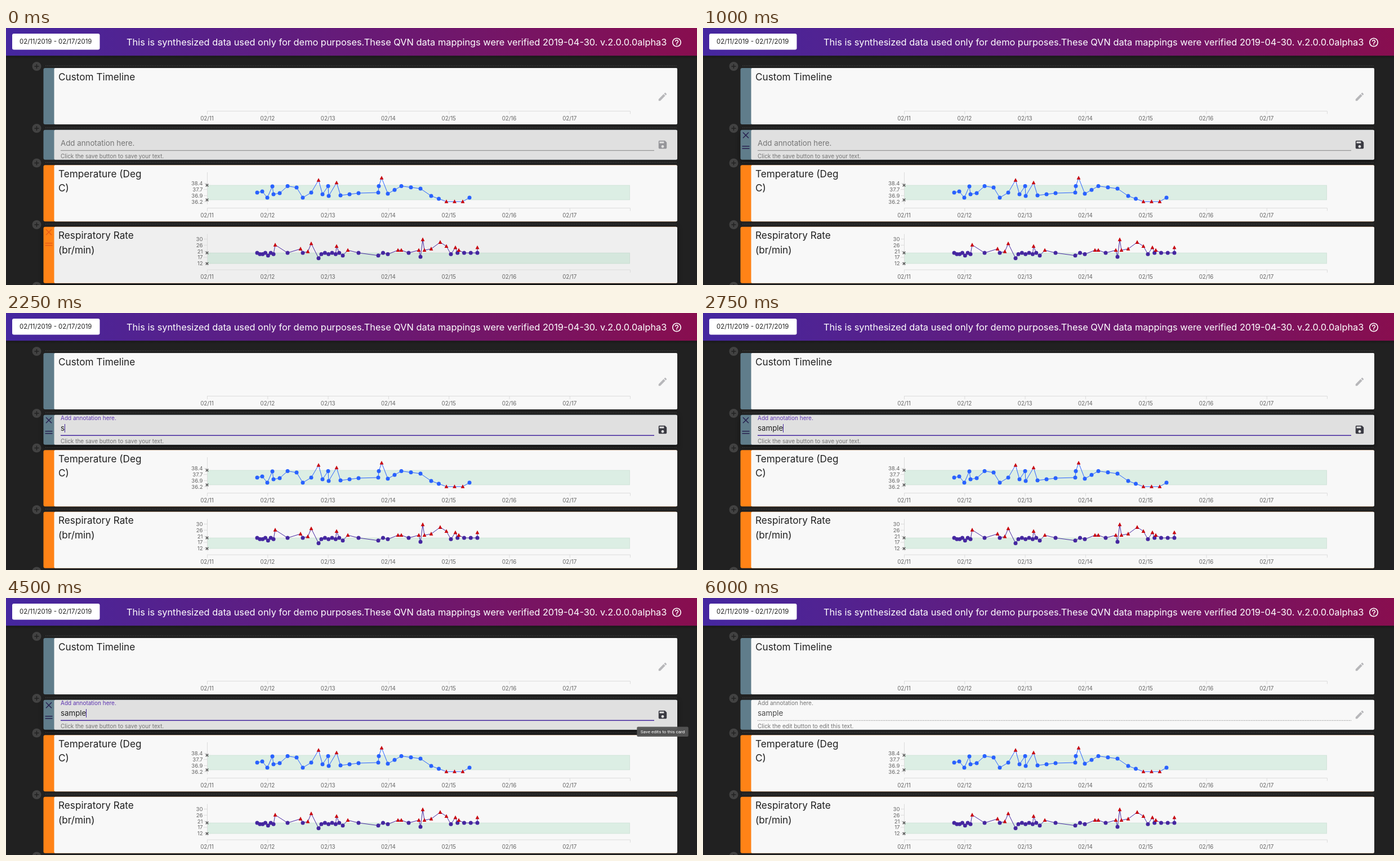
Write an HTML page that moves like this. It is 1227 by 456 pixels and loops after 6750 ms.

```html
<!DOCTYPE html>
<html lang="en">
<head>
<meta charset="utf-8">
<title>Patient timeline</title>
<style>
html, body { margin: 0; width: 100%; height: 100%; overflow: hidden; background: #212121; }
svg { display: block; font-family: Inter, "Open Sans", sans-serif; fill: #212121; }
.title { font-size: 17.2px; }
.axis { font-size: 9.8px; fill: #666; text-anchor: middle; }
.yaxis { font-size: 9.6px; fill: #666; text-anchor: end; }
.small { font-size: 10px; fill: #757575; }
.rule { stroke: #dcdcdc; fill: none; }
.tip { font: 8px Roboto, sans-serif; fill: #fff; text-anchor: middle; }
</style>
</head>
<body>
<svg id="stage" width="1227" height="456" viewBox="0 0 1227 456"></svg>
<script>
const LOOP = 6750;
const PENCIL = 'M3 17.25V21h3.75L17.81 9.94l-3.75-3.75L3 17.25zM20.71 7.04c.39-.39.39-1.02 0-1.41l-2.34-2.34c-.39-.39-1.02-.39-1.41 0l-1.83 1.83 3.75 3.75 1.83-1.83z';
const DISK = 'M17 3H5c-1.11 0-2 .9-2 2v14c0 1.1.89 2 2 2h14c1.1 0 2-.9 2-2V7l-4-4zm-5 16c-1.66 0-3-1.34-3-3s1.34-3 3-3 3 1.34 3 3-1.34 3-3 3zm3-10H5V5h10v4z';
const HELP = 'M11 18h2v-2h-2v2zm1-16C6.48 2 2 6.48 2 12s4.48 10 10 10 10-4.48 10-10S17.52 2 12 2zm0 18c-4.41 0-8-3.59-8-8s3.59-8 8-8 8 3.59 8 8-3.59 8-8 8zm0-14c-2.21 0-4 1.79-4 4h2c0-1.1.9-2 2-2s2 .9 2 2c0 2-3 1.75-3 5h2c0-2.25 3-2.5 3-5 0-2.21-1.79-4-4-4z';

// Turning points of the temperature; medium gaps get a reading halfway
const turns = [
  [446,292],[455,290],[464,301],[473,281],[475,295],[486,293],[500,280.5],[516,283],[527,301],
  [542,292],[555,270],[562,295],[572,280.5],[573,298],[587,274.5],[594,297],[626,293],[661,292],
  [662,280.5],[667,266],[678,294],[702,280.5],[736,285],[755,298],[782,308],[811,308],[823,301]];
const temperature = turns.flatMap(([x, y], i) => {
  const [nx, ny] = turns[i + 1] || [x, y], gap = nx - x;
  return gap > 20 && gap < 35 ? [[x, y], [(x + nx) / 2, (y + ny) / 2]] : [[x, y]];
});

// Respiration: quiet runs [from, to, count] wobble around 19, with outlying [x, rate] between
const quiet = [[446, 475, 7], [500, 527, 2], [560, 598, 7], [661, 678, 3], [790, 837, 5]];
const outliers = [
  [478,26],[523,23],[536,21],[542,27],[555,16],[587,25],[607,22],[626,20],[696,22],[702,22],
  [715,20],[733,22],[736,17],[740,30],[743,22],[755,23],[771,28],[782,25],[798,24],[804,22],[837,24]];
const respiration = quiet
  .flatMap(([from, to, n]) => Array.from({ length: n }, (_, i) => {
    const x = from + (to - from) * i / (n - 1);
    return [x, Math.round(19.2 + Math.cos((x - 446) * .48))];
  }))
  .concat(outliers)
  .sort((a, b) => a[0] - b[0])
  .map(([x, rate]) => [x, 399 + (20 - rate) * 2.36]);

const icon = (path, x, y, attrs) =>
  `<path d="${path}" transform="translate(${x - 9.6} ${y - 9.6}) scale(.8)" ${attrs}/>`;
const panel = (y, h, attrs) => `<rect x="85.5" y="${y}" width="1106.5" height="${h}" rx="2" ${attrs}/>`;

function divider(y, id = '') {
  return `<g id="${id}" stroke="#484848" fill="#424242">
    <path d="M70 ${y - 1}H1192" stroke-dasharray="1.5 1.5"/>
    <circle cx="54.5" cy="${y}" r="8" stroke="none"/>
    <path d="M50.5 ${y}h8m-4 -4v8" stroke="#212121" stroke-width="1.5"/></g>`;
}

function card(id, y, h, colour, iconColour, body) {
  return `<g id="${id}"><rect x="66.5" y="${y}" width="1125.5" height="${h}" rx="3" fill="${colour}"/>
    ${panel(y, h, 'class="face" fill="#f8f8f8"')}
    ${panel(y, h, 'class="shade" fill="#000"')}
    <path class="handle" d="M71 ${y + 4.5}l10 10m0 -10l-10 10M69.5 ${y + 29}h13m-13 4h13"
      stroke="${iconColour}" stroke-width="1.5"/>${body}</g>`;
}

function title(y, ...lines) {
  return lines.map((s, i) => `<text class="title" x="93" y="${y + 21.5 + i * 25.5}">${s}</text>`).join('');
}

function timeAxis(y) {
  let out = `<path class="rule" d="M357.5 ${y + 81.5}v-5H1108.5v5"/>`;
  for (let i = 0; i < 7; i++) {
    const x = 357 + i * 107.3;
    out += `<path class="rule" d="M${x + .5} ${y + 76}v6"/>
      <text class="axis" x="${x}" y="${y + 92.5}">02/${11 + i}</text>`;
  }
  return out;
}

function chart(y, points, colour, top, bottom, labels) {
  const cross = cy => `<path d="M354.7 ${cy - 2.3}l4.6 4.6m0 -4.6l-4.6 4.6" stroke="#555" stroke-width="1.5"/>`;
  const mark = ([x, py]) => py < top - .5 || py > bottom
    ? `<path d="M${x} ${py - 3.8}l3.4 6.6h-6.8z" fill="#c8000a"/>`
    : `<circle cx="${x}" cy="${py}" r="3.5" fill="${colour}"/>`;
  const ticks = labels.map((s, i) => {
    const ty = y + 65.2 - (labels.length - 1 - i) * 10.8;
    return `<path class="rule" d="M351 ${ty}h6"/><text class="yaxis" x="349.5" y="${ty + 3.5}">${s}</text>`;
  }).join('');
  return `<rect x="357.5" y="${top}" width="750" height="${bottom - top}" fill="#3db573" fill-opacity=".15"
      stroke="#7fa893" stroke-opacity=".2"/>
    <path class="rule" d="M357.5 ${y + 13}v57"/>${ticks}${timeAxis(y)}
    <path d="M${points.join('L')}" fill="none" stroke="${colour}"/>
    ${points.map(mark).join('')}${cross(top)}${cross(bottom)}`;
}

const note = `
  <text id="label" x="97">Add annotation here.</text>
  <text id="entry" x="97" y="209" font-size="13.3"></text>
  <rect id="caret" y="197" width="1" height="15" fill="#4527a0"/>
  <path id="line" d="M97 217.3H1151" stroke="#858585"/>
  <path id="focusLine" stroke="#4527a0" stroke-width="1.6"/>
  <text id="hint" class="small" x="97" y="230.5"></text>
  ${icon(DISK, 1166, 207, 'id="disk" fill="#3a3a42"')}
  ${icon(PENCIL, 1166, 207, 'id="pencil" fill="#3a3a42"')}`;

const $ = id => document.getElementById(id);
$('stage').innerHTML = `
  <defs>
    <linearGradient id="bar"><stop stop-color="#4527a0"/><stop offset="1" stop-color="#880e4f"/></linearGradient>
    <linearGradient id="fade" x2="0" y2="1"><stop stop-opacity=".25"/><stop offset="1" stop-opacity="0"/></linearGradient>
  </defs>
  <rect width="1227" height="49.2" fill="url(#bar)"/>
  <rect y="49.2" width="1227" height="6" fill="url(#fade)"/>
  <rect x="11" y="10" width="155.5" height="28.5" rx="3" fill="#fff"/>
  <text x="24" y="28" font-size="11.4">02/11/2019 - 02/17/2019</text>
  <text x="214" y="31" font-size="16.37" fill="#fff">This is synthesized data used only for demo purposes.These QVN data mappings were verified 2019-04-30. v.2.0.0.0alpha3</text>
  ${icon(HELP, 1191, 25.5, 'fill="#fff"')}
  ${[68, 178, 349, 458.5].map(y => divider(y)).join('')}${divider(239.5, 'gap')}
  ${card('custom', 71, 100, '#607d8b', '#263238',
    title(71, 'Custom Timeline') + timeAxis(71) + icon(PENCIL, 1166, 122, 'fill="#3a3a42" opacity=".34"'))}
  ${card('note', 180.7, 53, '#607d8b', '#27204f', note)}
  ${card('temp', 243.2, 100, '#ff8317', '#d84315', title(243, 'Temperature (Deg', 'C)')
    + chart(243, temperature, '#2962ff', 279, 305, ['38.4', '37.7', '36.9', '36.2']))}
  ${card('resp', 352.8, 100, '#ff8317', '#d84315', title(352.5, 'Respiratory Rate', '(br/min)')
    + chart(352.5, respiration, '#4527a0', 399, 418, [30, 26, 21, 17, 12]))}
  <g id="tip"><rect y="228.5" height="17.5" rx="2" fill="#555" fill-opacity=".95"/>
    <text class="tip" x="1166" y="240"></text></g>`;

// Value of the last [start, value] pair reached
const at = (t, ...steps) => steps.reduce((v, [start, next]) => t >= start ? next : v, steps[0][1]);
const set = (node, attrs) => { for (const k in attrs) node.setAttribute(k, attrs[k]); };

function hover(id, amount, shaded = true) {
  const g = $(id);
  g.style.filter = amount ? 'drop-shadow(0 3px 4px rgba(0,0,0,.5))' : '';
  set(g.querySelector('.shade'), { opacity: shaded ? Math.min(1, amount * 2) * .036 : 0 });
  set(g.querySelector('.handle'), { opacity: amount });
}

function render(t) {
  const saved = t >= 5000;
  const focus = saved ? 0 : at(t, [0, 0], [1500, .6], [1750, 1]);
  const lift = saved ? 1 : focus;
  const over = at(t, [0, 0], [750, .5], [1000, 1], [4000, .3], [4250, 1], [5750, .3], [6000, 0]);

  hover('custom', 0);
  hover('resp', at(t, [0, .6], [250, 0]));
  hover('temp', at(t, [0, 0], [250, .6], [500, .3], [750, 0]));
  hover('note', over, saved);
  set($('note').querySelector('.face'), { fill: saved ? '#f8f8f8' : '#e0e0e0' });
  set($('note').querySelector('.handle'), { stroke: saved ? '#263238' : '#27204f' });

  const lit = t >= 4000 && t < 4250;
  set($('gap'), {
    stroke: lit ? '#f0f0f0' : '#484848',
    fill: lit ? '#e0e0e0' : '#424242',
    'stroke-width': lit ? 1.6 : 1
  });

  set($('label'), { y: 209 - 19 * lift, 'font-size': 13.3 - 3.3 * lift, fill: focus ? '#5e35b1' : '#757575' });
  $('entry').textContent = at(t, [0, ''], [2250, 's'], [2500, 'samp'], [2750, 'sample']);
  set($('entry'), { fill: saved ? '#4a4a4a' : '#212121' });
  set($('caret'), {
    x: Math.round(97 + $('entry').getComputedTextLength()),
    opacity: at(t, [0, 0], [1500, 1], [1750, 0], [2250, 1], [3500, 0], [4000, 1], [5000, 0])
  });
  set($('line'), { 'stroke-dasharray': saved ? '1.5 1.5' : 'none', opacity: focus < 1 ? 1 : 0 });
  set($('focusLine'), { d: `M${624 - 527 * focus} 217.2H${624 + 527 * focus}` });
  const verb = saved ? 'edit' : 'save';
  $('hint').textContent = `Click the ${verb} button to ${verb} ${saved ? 'this' : 'your'} text.`;
  set($('disk'), { opacity: saved ? 0 : .45 + .55 * over });
  set($('pencil'), { opacity: saved ? .34 + .66 * over : 0 });

  const tip = at(t, [0, ''], [4500, 'Save edits to this card'], [5250, 'Edit this card'], [5750, '']);
  const [box, words] = $('tip').children;
  words.textContent = tip;
  const width = tip ? words.getComputedTextLength() + 13 : 0;
  set(box, { x: 1166 - width / 2, width });
}

function frame() {
  render(performance.now() % LOOP);
  requestAnimationFrame(frame);
}
frame();
</script>
</body>
</html>
```
